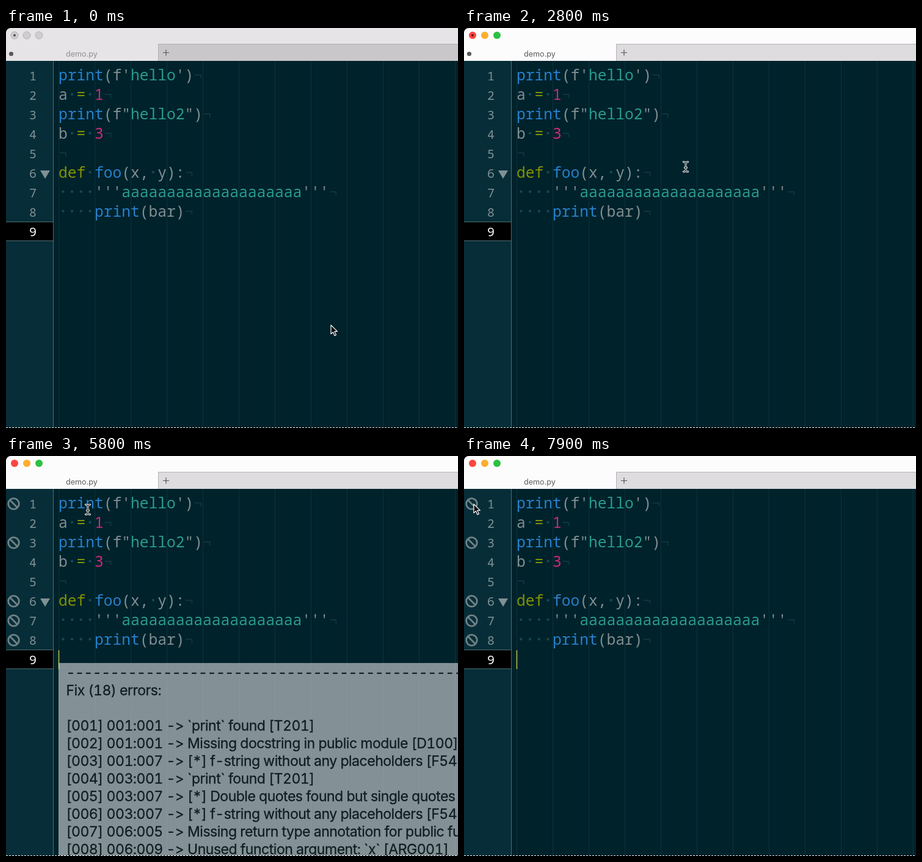
Recreate the animation shown at these times as an HTML page. Size 740 by 657 pixels, loop 8 s.

```html
<!DOCTYPE html>
<html lang="en">
<head>
<meta charset="utf-8">
<title>Editor linting demo</title>
<style>
  html, body { margin: 0; width: 100%; height: 100%; overflow: hidden; background: #000; }
  svg { display: block; width: 740px; height: 657px; }
  .code, .number { font-family: "Noto Sans Mono", "DejaVu Sans Mono", monospace; }
  .code { font-size: 24.58px; fill: #7f8f92; }
  .number { font-size: 20px; fill: #7f9194; }
  .current { fill: #fff; }
  .call { fill: #2680cc; }
  .string { fill: #2a9a8e; }
  .keyword { fill: #7f9300; }
  .digit { fill: #cc2b79; }
  .blank { fill: #113740; }
  .dot { fill: #17454f; font-weight: 700; }
  .popup text {
    font: 23px Inter, Roboto, sans-serif; font-variant-numeric: tabular-nums;
    letter-spacing: -.48px; fill: #1b1b1d; stroke: #1b1b1d; stroke-width: .3;
  }
  .title { font: 12.6px Inter, Roboto, sans-serif; }
</style>
</head>
<body>
<svg id="stage" viewBox="0 0 740 657" xmlns="http://www.w3.org/2000/svg">
  <path id="bar" d="M0 54V8A8 8 0 0 1 8 0H740V54Z"/>
  <path id="spareTab" d="M249 26H740V54H249Z"/>
  <path d="M740 26.5H249.5V54" fill="none" stroke="#b4b1b4"/>
  <path d="M257 40.5H267M262 35.5V45.5" stroke="#555355" stroke-width="1.2"/>
  <g id="lights"></g>
  <circle id="closeDot" cx="14" cy="12" r="2"/>
  <circle id="tabDot" cx="8.5" cy="42.5" r="3.6" fill="#5b595b"/>
  <text id="tabName" class="title" x="98" y="47">demo.py</text>

  <rect y="54" width="740" height="603" fill="#00222b"/>
  <rect y="54" width="77" height="603" fill="#072e38"/>
  <path id="rulers" stroke="#0b333c"/>
  <path d="M77.5 54V657" stroke="#506d72"/>
  <rect y="318" width="77" height="32" fill="#506d72"/>
  <rect y="319" width="77" height="30" fill="#000"/>
  <path d="M56 234H72L64 247.5Z" fill="#7f9194"/>
  <g id="lines"></g>
  <g id="marks" fill="none" stroke="#718286" stroke-width="2.8"></g>
  <path id="caret" d="M86.5 319V350" stroke="#c3cf4c" stroke-width="1.4"/>
  <g id="popup" class="popup"><rect x="86" y="340" width="654" height="317" fill="#e6e3e7"/></g>

  <path d="M0 656.5H740" stroke="#000"/>
  <path d="M0 656.5H740" stroke="#fff" stroke-dasharray="3 2"/>
  <path id="arrow" d="M0 0V14.6L3.5 11.4L5.9 17.2L8.4 16.1L6 10.4H10.4Z" fill="#06090a" stroke="#fff" stroke-width="1.2" stroke-linejoin="round"/>
  <g id="beam" fill="none" stroke-linecap="round">
    <path id="beamEdge" stroke="#fff" stroke-width="2.9"/>
    <path id="beamCore" stroke="#10191b" stroke-width="1.1"/>
  </g>
</svg>
<script>
const LOOP = 8000, FOCUS = 700, SAVE = 3200, LINT = 3400;
const FADE_START = 5560, FADE_END = 6120;
const $ = id => document.getElementById(id);

function add(parent, tag, attrs, text = '') {
  const node = document.createElementNS('http://www.w3.org/2000/svg', tag);
  for (const key in attrs) node.setAttribute(key, attrs[key]);
  node.textContent = text;
  parent.append(node);
  return node;
}

const lineY = n => 46 + 32 * n;

// Each token is "style|text"; a bare token uses the default colour.
const source = [
  ['call|print', "(f'", 'string|hello', "')", 'blank|¬'],
  ['a', 'dot|·', 'keyword|=', 'dot|·', 'digit|1', 'blank|¬'],
  ['call|print', '(f"', 'string|hello2', '")', 'blank|¬'],
  ['b', 'dot|·', 'keyword|=', 'dot|·', 'digit|3', 'blank|¬'],
  ['blank|¬'],
  ['keyword|def', 'dot|·', 'call|foo', '(x,', 'dot|·', 'y):', 'blank|¬'],
  ['dot|····', "'''", 'string|' + 'a'.repeat(20), "'''", 'blank|¬'],
  ['dot|····', 'call|print', '(bar)', 'blank|¬'],
  []
];
source.forEach((tokens, i) => {
  const y = lineY(i + 1), current = i === 8 ? ' current' : '';
  add($('lines'), 'text', { class: 'number' + current, x: 38, y: y + 7.5 }, i + 1);
  const row = add($('lines'), 'text', { class: 'code', x: 86, y: y + 7.5 });
  for (const token of tokens) {
    const [style, text] = token.includes('|') ? token.split('|') : ['', token];
    add(row, 'tspan', { class: style }, text);
  }
});

for (const n of [1, 3, 6, 7, 8]) {
  const y = lineY(n) + .5;
  add($('marks'), 'circle', { cx: 12.5, cy: y, r: 8.8 });
  add($('marks'), 'path', { d: `M6.3 ${y - 6.2}L18.7 ${y + 6.2}` });
}

const report = [
  '-'.repeat(80),
  'Fix (18) errors:',
  '',
  '[001] 001:001 -> `print` found [T201]',
  '[002] 001:001 -> Missing docstring in public module [D100]',
  '[003] 001:007 -> [*] f-string without any placeholders [F541]',
  '[004] 003:001 -> `print` found [T201]',
  '[005] 003:007 -> [*] Double quotes found but single quotes preferred [Q000]',
  '[006] 003:007 -> [*] f-string without any placeholders [F541]',
  '[007] 006:005 -> Missing return type annotation for public function `foo` [ANN201]',
  '[008] 006:009 -> Unused function argument: `x` [ARG001]'
];
report.forEach((text, i) => add($('popup'), 'text', { x: 98.5, y: 363.5 + 29 * i }, text));

$('rulers').setAttribute('d', Array.from({ length: 12 }, (_, i) => `M${86.5 + 59 * i} 54V657`).join(''));
const beamShape = 'M-3.6 -8Q-.5 -8 0 -5.5Q.5 -8 3.6 -8M0 -5.5V5.5M-3.6 8Q-.5 8 0 5.5Q.5 8 3.6 8M-1.6 1.5H1.6';
$('beamEdge').setAttribute('d', beamShape);
$('beamCore').setAttribute('d', beamShape);

const lightColors = ['#fc4641', '#fdaf2f', '#2cc141'];
const lights = lightColors.map((_, i) => add($('lights'), 'circle', { cx: 14 + 20 * i, cy: 12, r: 6 }));

// Pointer stops: time, x, y
const pointerPath = [
  [0, 532, 488], [100, 532, 488], [750, 371, 363], [1200, 371, 363], [2000, 363, 228],
  [5250, 363, 228], [5800, 134, 88], [6100, 108, 79], [6300, 108, 79], [7100, 16, 79], [LOOP, 16, 79]
];
function pointerAt(t) {
  const i = pointerPath.findIndex(stop => stop[0] > t);
  const [t0, x0, y0] = pointerPath[i - 1], [t1, x1, y1] = pointerPath[i];
  const p = (t - t0) / (t1 - t0), k = p * p * (3 - 2 * p);
  return [x0 + (x1 - x0) * k, y0 + (y1 - y0) * k];
}

function caretOn(t) {
  if (t < 850) return false;
  const start = t < SAVE ? 850 : 620;
  return (t - start + 1000) % 1000 < 460;
}

const show = (id, on) => $(id).setAttribute('visibility', on ? 'visible' : 'hidden');
const fill = (node, color) => node.setAttribute('fill', color);

function render(t) {
  const active = t >= FOCUS, saved = t >= SAVE;
  fill($('bar'), active ? '#fdfcfd' : '#e7e4e7');
  fill($('spareTab'), active ? '#dedcde' : '#cac7ca');
  fill($('tabName'), active ? '#5c5a5c' : '#918e91');
  fill($('closeDot'), active ? '#790d0b' : '#555255');
  lights.forEach((light, i) => {
    fill(light, active ? lightColors[i] : '#d0cdd0');
    light.setAttribute('stroke', active ? 'none' : '#b3b0b3');
  });
  show('closeDot', !saved);
  show('tabDot', !saved);
  show('marks', t >= LINT);
  show('caret', caretOn(t));

  const fade = Math.min(1, Math.max(0, (FADE_END - t) / (FADE_END - FADE_START)));
  $('popup').setAttribute('opacity', t >= LINT ? fade : 0);

  const [x, y] = pointerAt(t), isArrow = !active || x < 78;
  show('arrow', isArrow);
  show('beam', !isArrow);
  $(isArrow ? 'arrow' : 'beam').setAttribute('transform', `translate(${x} ${y})`);
}

const began = performance.now();
function tick() {
  render((performance.now() - began) % LOOP);
  requestAnimationFrame(tick);
}
tick();
</script>
</body>
</html>
```
